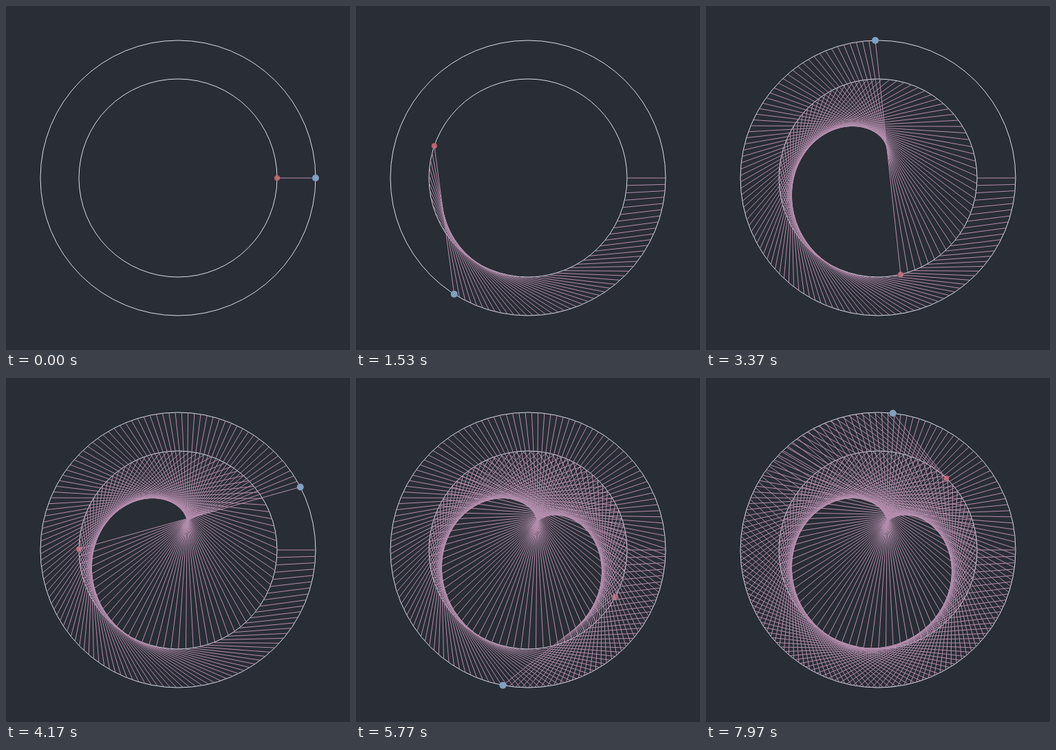
Recreate the animation shown at these times as an HTML page. Size 500 px wide and 500 px high, loop 8 s.

```html
<!DOCTYPE html>
<html lang="en">
<head>
<meta charset="utf-8">
<title>Orbit lines</title>
<style>
  html, body { margin: 0; width: 100%; height: 100%; overflow: hidden; background: #292d35; }
  svg { display: block; width: 100%; height: 100%; }
  .orbit { fill: none; stroke: #d8dee9; }
  #links { stroke: #b48ead; }
  #inner { fill: #bf616a; }
  #outer { fill: #81a1c1; }
</style>
</head>
<body>
<svg viewBox="0 0 500 500">
  <circle class="orbit" cx="250" cy="250" r="200"/>
  <circle class="orbit" cx="250" cy="250" r="144"/>
  <circle id="inner" r="4"/>
  <g id="links"></g>
  <circle id="outer" r="5"/>
</svg>
<script>
const LOOP = 8000, STEPS = 240;
const INNER = { radius: 144, turn: 4.3245 };
const OUTER = { radius: 200, turn: 2.662 };
const inner = document.getElementById('inner');
const outer = document.getElementById('outer');
const links = document.getElementById('links');

// Orbits run clockwise from the right; turn is degrees per step.
function position({ radius, turn }, step) {
  const a = step * turn * Math.PI / 180;
  return [250 + radius * Math.cos(a), 250 + radius * Math.sin(a)];
}

function setAttrs(el, attrs) {
  for (const key in attrs) el.setAttribute(key, attrs[key]);
}

function place(dot, [cx, cy]) {
  setAttrs(dot, { cx, cy });
}

const lines = Array.from({ length: STEPS }, (_, i) => {
  const line = document.createElementNS('http://www.w3.org/2000/svg', 'line');
  const [x1, y1] = position(INNER, i);
  const [x2, y2] = position(OUTER, i);
  setAttrs(line, { x1, y1, x2, y2 });
  return links.appendChild(line);
});

let shown = -1;

function render(ms) {
  // 30 steps per second, with starts rounded to 10 ms
  const step = Math.min(STEPS - 1, Math.floor((Math.floor(ms / 10) + 0.5) * 0.3));
  if (step === shown) return;
  shown = step;
  lines.forEach((line, i) => { line.style.display = i <= step ? '' : 'none'; });
  place(inner, position(INNER, step));
  place(outer, position(OUTER, step));
}

const start = performance.now();

function tick() {
  render((performance.now() - start) % LOOP);
  requestAnimationFrame(tick);
}

tick();
</script>
</body>
</html>
```
